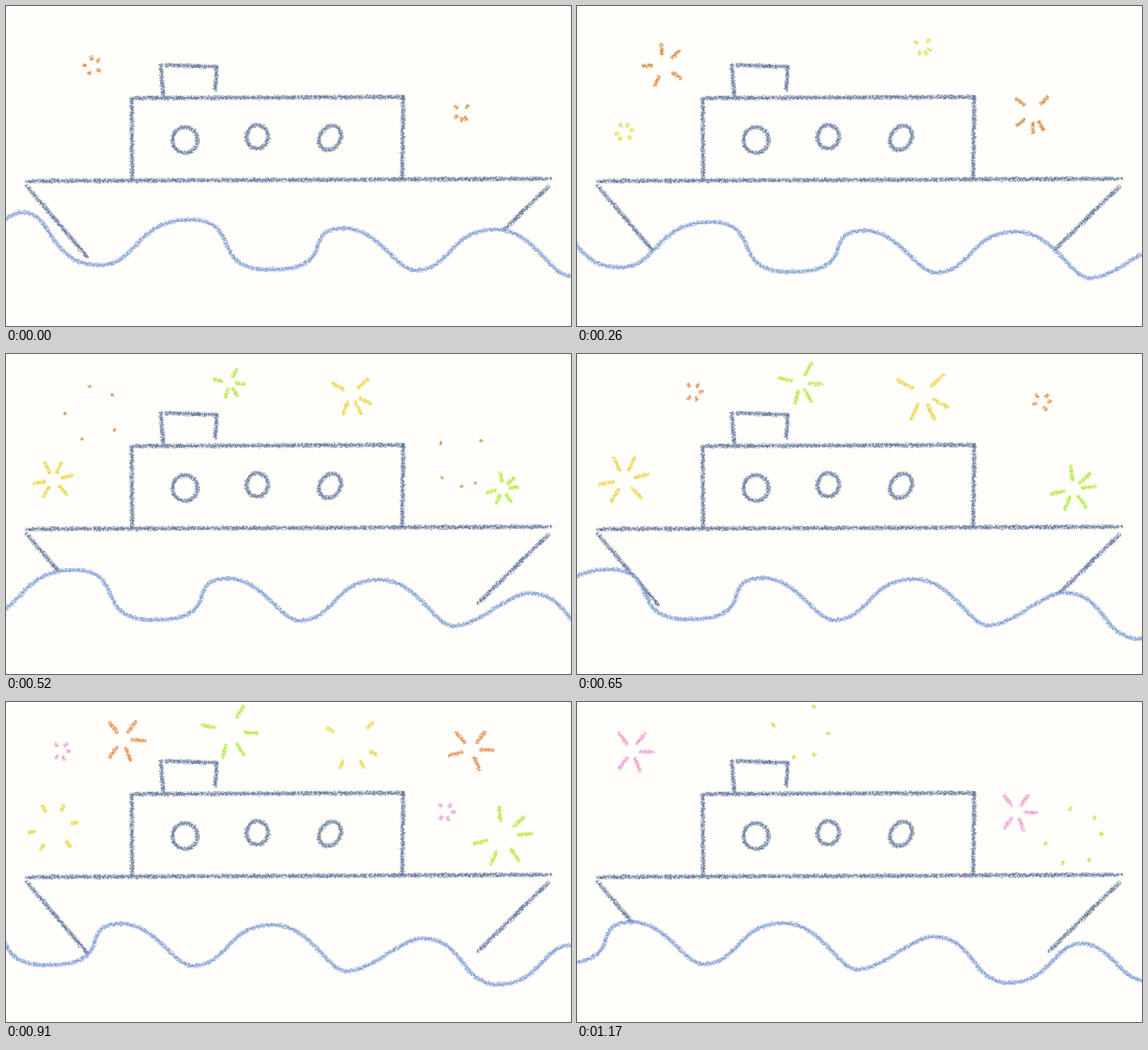
Write an HTML page with a canvas that moves like this. It is 994x563 px and loops after 1.3 s.

```html
<!DOCTYPE html>
<html lang="en">
<head>
<meta charset="utf-8">
<title>Crayon ship</title>
<style>
  html, body { margin: 0; width: 100%; height: 100%; overflow: hidden; background: #fffefa; }
  canvas { display: block; width: 994px; height: 563px; }
</style>
</head>
<body>
<canvas id="stage" width="994" height="563"></canvas>
<script>
const W = 994, H = 563, STEP = 130, STEPS = 10;
const PAPER = '#fffefa', NAVY = '#566a93', BLUE = '#7695d2';
const { PI, sin, cos, min, max, hypot, floor } = Math;

function rng(seed) {
  return () => {
    seed = (seed + 0x6D2B79F5) | 0;
    let t = Math.imul(seed ^ (seed >>> 15), 1 | seed);
    t = (t + Math.imul(t ^ (t >>> 7), 61 | t)) ^ t;
    return ((t ^ (t >>> 14)) >>> 0) / 4294967296;
  };
}

function layer(w) {
  const c = document.createElement('canvas');
  c.width = w;
  c.height = H;
  return c;
}

// Scatters fine grains along a path; the ends fade over `taper` pixels
function crayon(g, path, color, { width = 10, grain = 8.5, taper = 4, seed = 1 } = {}) {
  const rand = rng(seed);
  const lens = path.slice(1).map((q, i) => hypot(q[0] - path[i][0], q[1] - path[i][1]));
  const total = lens.reduce((a, b) => a + b, 0);
  let done = 0;
  g.fillStyle = color;
  lens.forEach((len, i) => {
    const [x, y] = path[i], [x2, y2] = path[i + 1];
    const ux = (x2 - x) / (len || 1), uy = (y2 - y) / (len || 1);
    const count = floor(len * grain + rand());
    for (let k = 0; k < count; k++) {
      const d = rand() * len, end = min(done + d, total - done - d);
      const fade = taper ? min(1, 0.35 + end / taper) : 1;
      if (rand() > fade) continue;
      const off = (rand() + rand() - 1) * width / 2 * (0.6 + 0.4 * fade);
      const slip = rand() * 2 - 1, size = 0.7 + rand() * 0.8;
      g.globalAlpha = 0.3 + rand() * 0.6;
      g.fillRect(x + ux * (d + slip) - uy * off - size / 2, y + uy * (d + slip) + ux * off - size / 2, size, size);
    }
    done += len;
  });
  g.globalAlpha = 1;
}

// Ship
const ship = layer(W);
{
  const g = ship.getContext('2d');
  const line = (x, y, x2, y2, taper = 3) =>
    crayon(g, [[x, y], [x2, y2]], NAVY, { taper, seed: x * 7 + y });
  line(33, 308, 960, 304, 22);      // deck
  line(34, 314, 145, 444, 5);       // hull
  line(956, 316, 828, 441, 14);
  line(221, 160, 222, 306);         // cabin
  line(222, 162, 701, 160, 10);
  line(699, 157, 697, 305);
  line(272, 101, 277, 159);         // funnel
  line(279, 104, 374, 107);
  line(371, 106, 368, 150);

  const porthole = (x, y, rx, ry, tilt) => {
    const ring = Array.from({ length: 41 }, (_, i) => {
      const u = rx * cos(i * PI / 20), v = ry * sin(i * PI / 20);
      return [x + u * cos(tilt) - v * sin(tilt), y + u * sin(tilt) + v * cos(tilt)];
    });
    crayon(g, ring, NAVY, { taper: 0, seed: x });
  };
  porthole(315, 236, 22, 23, 0);
  porthole(442, 230, 19, 21, 0.1);
  porthole(570, 232, 18, 23, 0.6);
}

// Crests and troughs: x, y and the reach of the level handle on each side
const swells = [
  [-105, 456, 0, 60], [30, 363, 50, 54], [165, 456, 92, 68], [325, 376, 100, 90],
  [462, 464, 104, 130], [595, 391, 82, 60], [720, 465, 34, 64], [862, 393, 83, 65],
  [990, 475, 31, 45], [1123, 417, 35, 77], [1259, 498, 70, 72], [1385, 429, 49, 52],
  [1497, 494, 44, 40], [1590, 440, 40, 0]
];
const wave = [];
for (let i = 1; i < swells.length; i++) {
  const [x, y, , right] = swells[i - 1], [x2, y2, left] = swells[i];
  for (let t = 0; t < 1; t += 1 / 32) {
    const s = 1 - t;
    wave.push([
      s * s * s * x + 3 * s * s * t * (x + right) + 3 * s * t * t * (x2 - left) + t * t * t * x2,
      y + (y2 - y) * t * t * (3 - 2 * t)
    ]);
  }
}

// Paper below the wave hides the hull
const sea = layer(1520);
{
  const g = sea.getContext('2d');
  g.fillStyle = PAPER;
  g.beginPath();
  g.moveTo(wave[0][0], H);
  wave.forEach(p => g.lineTo(...p));
  g.lineTo(1590, H);
  g.fill();
  crayon(g, wave, BLUE, { taper: 0, seed: 42 });
}
const slide = s => 55.3 * s - 13 * (sin(PI * s / 9) + sin(2 * PI * s / 9));
const bob = s => 4.5 * sin(2 * PI * s / 13);

// Fireworks: a larger `life` makes the rays burn away more slowly
const kinds = {
  amber:  { color: '#d5853f', born: 0, steps: 5, life: 4.3 },
  yellow: { color: '#e8d540', born: 2, steps: 7, life: 6.5 },
  green:  { color: '#aee935', born: 3, steps: 7, life: 6.6 },
  orange: { color: '#e98443', born: 5, steps: 4, life: 6 },
  pink:   { color: '#ee97d0', born: 7, steps: 3, life: 7 }
};
const star = [233, -54, 3, 69, 126];
const bursts = [];
const burst = (kind, x, y, reach, angles = star) => bursts.push({ ...kinds[kind], x, y, reach, angles });

burst('amber', 152, 105, 51, [-43, -96, 180, 113, 36]);
burst('amber', 802, 186, 50, [218, -45, 138, 90, 60]);
burst('yellow', 608, 70, 52, [209, -42, 28, 114, 65]);
burst('yellow', 83, 222, 46, [245, -65, -14, 46, 121, 170]);
burst('green', 393, 50, 52, [191, -60, 6, 104, 60]);
burst('green', 873, 237, 54, [264, -42, -6, 55, 112, 166]);
burst('orange', 205, 66, 53);
burst('orange', 818, 84, 53, [229, -52, 1, 67, 165]);
burst('pink', 97, 86, 52);
burst('pink', 773, 193, 47);

const ctx = document.getElementById('stage').getContext('2d');

function drawBurst({ color, born, steps, life, x, y, reach, angles }, step) {
  const age = step - born;
  if (age < 0 || age >= steps) return;
  const outer = 18 + (reach - 18) * min(1, age / 3);
  const inner = min(outer - 3, 9 + (reach - 9) * (age / life) ** 2);
  angles.forEach((deg, i) => {
    const a = deg * PI / 180;
    const at = r => [x + r * cos(a), y + r * sin(a)];
    crayon(ctx, [at(inner), at(outer)], color, { width: 9, taper: 3, seed: x * 31 + i * 7 + step });
  });
}

function draw(step) {
  ctx.fillStyle = PAPER;
  ctx.fillRect(0, 0, W, H);
  ctx.drawImage(ship, 0, 0);
  ctx.drawImage(sea, -Math.round(slide(step)), Math.round(bob(step)));
  bursts.forEach(b => drawBurst(b, step));
}

let shown = -1;
const start = performance.now();
function tick() {
  const step = floor(max(0, performance.now() - start) / STEP) % STEPS;
  if (step !== shown) draw(shown = step);
  requestAnimationFrame(tick);
}
tick();
</script>
</body>
</html>
```
